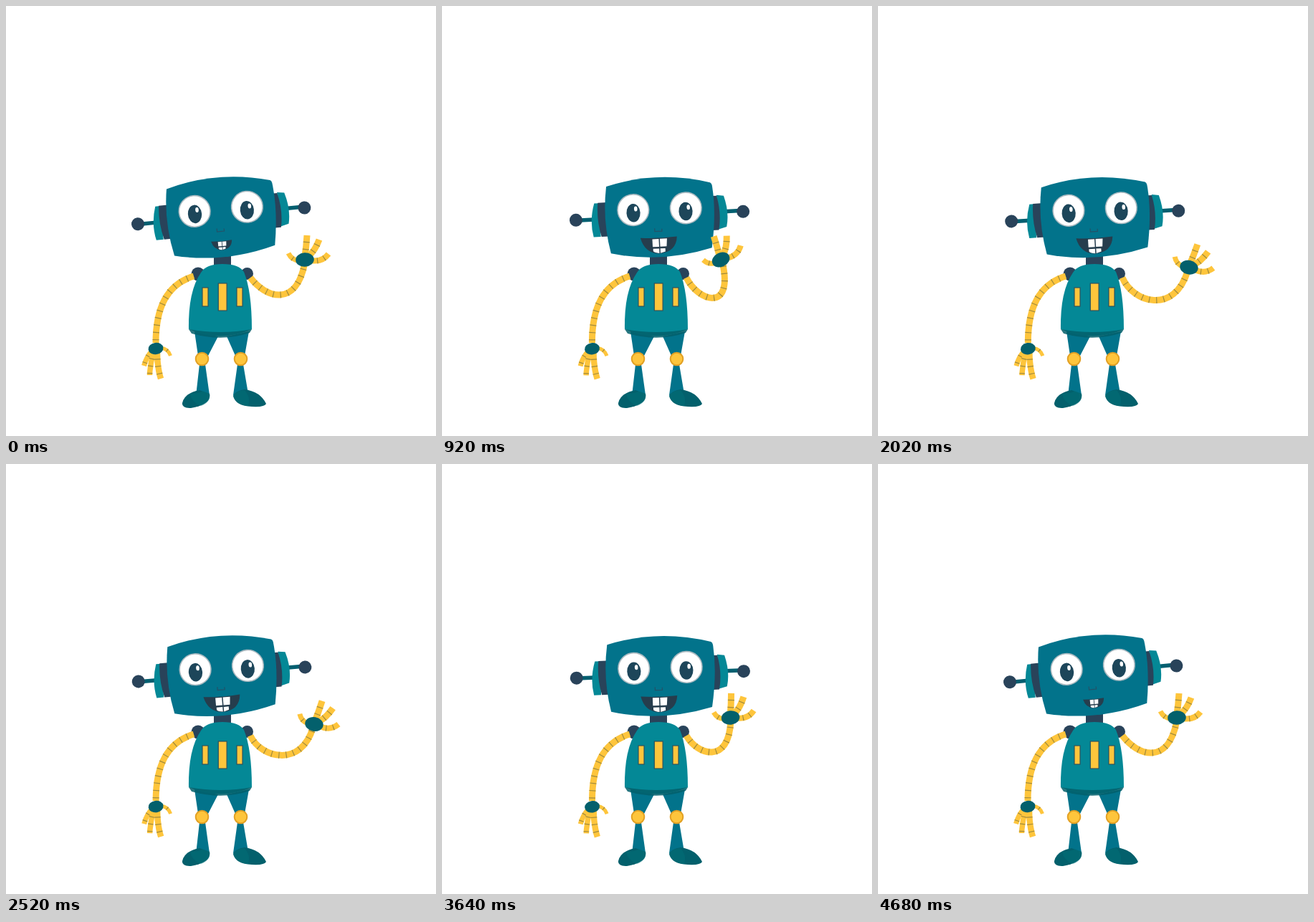
An HTML page for the animation above (4780 ms loop, 600 px wide and 600 px high).

```html
<!DOCTYPE html>
<html lang="en">
<head>
<meta charset="utf-8">
<title>Waving robot</title>
<style>
  html, body { margin: 0; width: 100%; height: 100%; overflow: hidden; background: #fff; }
  svg { display: block; width: 100vw; height: 100vh; }
  .face { fill: #02738b; }
  .body { fill: #048896; }
  .deep { fill: #03606c; }
  .navy { fill: #29435a; }
  .gold { fill: #fec53c; }
  .tube path { fill: none; stroke: #fec53c; stroke-width: 9; }
  .tube path.rib { stroke: #a08a3c; stroke-dasharray: 0 9 1.2 0; }
  .panel rect { fill: #fec53c; stroke: #31525a; stroke-width: 1.2; }
  .eye { fill: #fff; stroke: #a9b9c0; stroke-width: 1.6; }
  .pupil { fill: #1d465a; }
</style>
</head>
<body>
<svg viewBox="0 0 600 600">
  <g id="legs">
    <path class="face" d="M263 454L296 461 282 488H268ZM308 461L339 454 333 488H320Z"/>
    <path class="face" d="M270 500H278L284 543 265 544ZM323 500H331L338 541 317 543Z"/>
    <path class="deep" d="M246 554Q249 540 270 536L284 541Q287 556 258 561 245 561 246 554Z"/>
    <path class="deep" d="M317 544Q320 537 333 535 355 538 363 555 361 560 343 559 320 558 317 544Z"/>
    <path d="M257 541Q270 541 275 537L284 541Q286 553 272 558 258 552 257 541ZM333 536Q342 546 338 558 320 556 317 544 321 537 333 536Z" fill="#02717a" opacity=".45"/>
    <g class="gold" stroke="#e2a024" stroke-width="2">
      <circle cx="273.5" cy="492.5" r="8.8"/><circle cx="327.5" cy="492.5" r="8.8"/>
    </g>
  </g>

  <circle class="navy" cx="268" cy="374" r="9.5"/>
  <circle class="navy" cx="336.5" cy="373.5" r="8.5"/>
  <g id="left" class="tube">
    <path d="M262 377C225 388 209 420 209 470"/>
    <path class="rib" d="M262 377C225 388 209 420 209 470"/>
    <g id="leftFingers"></g>
    <ellipse class="deep" cx="209" cy="478" rx="10.5" ry="8.2" transform="rotate(-8 209 478)"/>
  </g>

  <path class="navy" d="M290 343H314V366H290Z"/>
  <path class="body" d="M272 372Q279 360 302 360 325 360 332 371 343 398 343 451 300 470 255 451 254 398 272 372Z"/>
  <path class="deep" d="M255 451Q300 459 343 451L340 456Q302 469 259 457Z" fill-opacity=".85"/>
  <g class="panel">
    <rect x="274" y="393" width="8" height="26"/>
    <rect x="296.3" y="387" width="11.8" height="38"/>
    <rect x="322" y="393" width="8" height="26"/>
  </g>

  <g id="head">
    <path d="M192 293.4H216M398 291.5H424" stroke="#035f70" stroke-width="5.5"/>
    <circle class="navy" cx="190.5" cy="293" r="9"/>
    <circle class="navy" cx="424" cy="293" r="9"/>
    <path class="body" d="M217 271H224V318H214Q209 295 217 271ZM388 268L398 269.500Q405 293 400 313L388 316Z"/>
    <path class="navy" d="M222 270.500H240V318H225Q219 295 222 270.500ZM375 269H388Q394 293 389 317H375Z"/>
    <path class="face" d="M235 248.500Q306 229 380 250 382 251 382.500 254 387 292 378 341 306 359.500 237 342 227 295 235 248.500Z"/>
    <circle class="eye" cx="271" cy="283" r="21.800"/>
    <circle class="eye" cx="344.500" cy="284" r="21.800"/>
    <ellipse class="pupil" cx="271" cy="287" rx="9.600" ry="12.800"/>
    <ellipse class="pupil" cx="344" cy="288.500" rx="9.600" ry="12.800"/>
    <ellipse cx="274.500" cy="281.500" rx="2.300" ry="3.500" fill="#fff"/>
    <ellipse cx="348" cy="283" rx="2.300" ry="3.500" fill="#fff"/>
    <path d="M299.500 310V314.500H309.500V311" fill="none" stroke="#245268" stroke-width="1.200"/>
    <g id="mouth">
      <path d="M279 322.500Q304 325 330 323 328 345 304 345.500 284 344 279 322.500Z" fill="#263d4d"/>
      <path d="M295.500 325H304.500V336H295.500ZM306 325H316L315 336H306ZM296 338.500H304.500V345Q298 344.500 296 342ZM306 338.500H313V343L306 345Z" fill="#fff"/>
    </g>
  </g>

  <g id="right" class="tube">
    <path id="arm"/>
    <path id="armRibs" class="rib"/>
    <g id="hand">
      <g id="rightFingers"></g>
      <ellipse class="deep" rx="12.8" ry="9.800" transform="rotate(-4)"/>
    </g>
  </g>
</svg>
<script>
  const LOOP = 4780;
  const $ = id => document.getElementById(id);

  // Each finger: path and width.
  const fingers = (id, list) => {
    $(id).innerHTML = list.map(([d, w]) =>
      `<path d="${d}" style="stroke-width:${w}"/>` +
      `<path class="rib" d="${d}" style="stroke-width:${w}"/>`).join('');
  };
  fingers('leftFingers', [
    ['M204 481Q196 489 192.500 502', 7],
    ['M206 483Q201 499 200.500 515', 7.5],
    ['M211 483Q211 504 216 520', 8.5],
    ['M216 477Q226 478 229.500 488', 5]
  ]);
  fingers('rightFingers', [
    ['M0 -5Q2 -18 3 -34', 9],
    ['M5 -5Q14 -12 20 -28', 9],
    ['M8 1Q24 4 33 -8', 8],
    ['M-8 1Q-18 1 -23 -9', 7]
  ]);

  // time, tilt, drop
  const headKeys = [
    [0, -5.6, 0], [580, -4.2, 0], [920, -2.95, 0], [1520, -.45, 0],
    [1660, -.1, .1], [2270, -5.6, .4], [2520, -4.9, .7], [3240, 0, 1.7],
    [4040, -5.2, .2], [4250, -5.6, 0]
  ];
  // time, two control points, hand centre, hand angle
  const armKeys = [
    [0, 362, 407, 405, 422, 417, 354, 0],
    [890, 357, 412, 407, 428, 389, 354, -22],
    [1520, 358, 418, 415, 440, 414, 362, -2],
    [2220, 355, 412, 413, 428, 437, 365, 18],
    [2520, 355, 410, 412, 425, 430, 363, 14],
    [3260, 352, 405, 398, 419, 391, 354, -5],
    [4040, 361, 407, 404, 422, 416, 354, -1],
    [4400, 362, 407, 405, 422, 417, 354, 0]
  ];
  const mouthKeys = [[0, .57], [480, 1], [4300, 1], [4680, .57]];

  // Smooth curve through the keys that rests at every turning point.
  function track(keys, t) {
    const last = keys.length - 1;
    if (t >= keys[last][0]) return keys[last].slice(1);
    let i = 0;
    while (keys[i + 1][0] <= t) i++;
    const a = keys[i], b = keys[i + 1], span = b[0] - a[0], u = (t - a[0]) / span;
    const slope = (k, c) => (keys[k + 1][c] - keys[k][c]) / (keys[k + 1][0] - keys[k][0]);
    const tangent = (k, c) => {
      if (k === 0 || k === last) return 0;
      const p = slope(k - 1, c), q = slope(k, c);
      return p * q > 0 ? 2 * p * q / (p + q) : 0;
    };
    return a.slice(1).map((v, n) => {
      const c = n + 1, m0 = tangent(i, c) * span, m1 = tangent(i + 1, c) * span;
      const d = b[c] - v;
      return v + u * (m0 + u * (3 * d - 2 * m0 - m1 + u * (m0 + m1 - 2 * d)));
    });
  }

  function draw(t) {
    const [tilt, drop] = track(headKeys, t);
    $('head').setAttribute('transform', `translate(0 ${drop}) rotate(${tilt} 302 365)`);
    $('left').setAttribute('transform', `rotate(${-.1 * (tilt + 5.6)} 264 377)`);

    const [open] = track(mouthKeys, t);
    $('mouth').setAttribute('transform', `translate(304 334) scale(${open}) translate(-304 -334)`);

    const [ax, ay, bx, by, x, y, turn] = track(armKeys, t);
    const d = `M341 379C${ax} ${ay} ${bx} ${by} ${x - turn * .1} ${y + 4}`;
    $('arm').setAttribute('d', d);
    $('armRibs').setAttribute('d', d);
    $('hand').setAttribute('transform', `translate(${x} ${y}) rotate(${turn})`);
  }

  const start = performance.now();
  function tick() {
    draw((performance.now() - start) % LOOP);
    requestAnimationFrame(tick);
  }
  tick();
</script>
</body>
</html>
```
